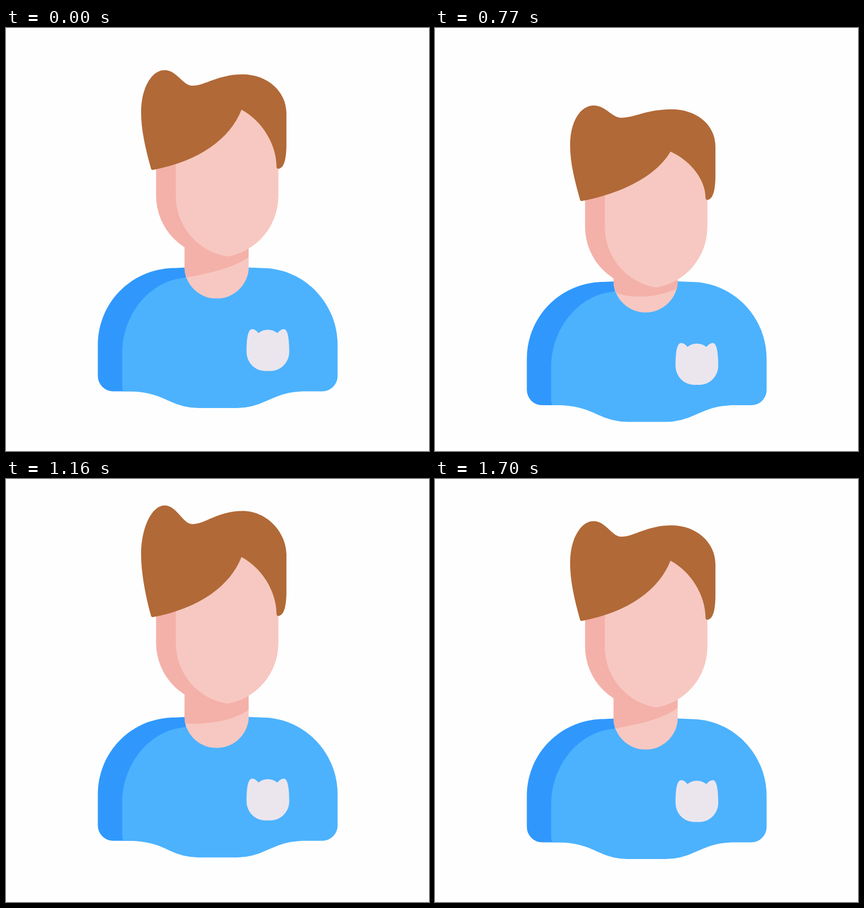
An HTML page for the animation above (1.73 s loop, 748 px wide and 748 px high).

```html
<!DOCTYPE html>
<html>
<head>
<meta charset="utf-8">
<style>
  html, body { margin: 0; height: 100%; overflow: hidden; background: #fefefe; }
  svg { display: block; width: 100%; height: 100%; }
</style>
</head>
<body>
<svg viewBox="-0.4 -0.5 748 748">
  <clipPath id="neckClip"><path d="M315 345V421A57 57 0 0 0 429 421V345Z"/></clipPath>
  <g id="body">
    <path fill="#3098fd" d="M162 560C162 485 222 424 298 424L318 423V642H189A27 27 0 0 1 162 615Z"/>
    <path fill="#4cb2fe" d="M318 441C255 445 205 505 205 575V632Q205 638 207 642H213C254 642 273 652 288 659Q314 671.500 340 671.500H408Q434 671.500 460 659C475 653 494 642 530 642H559A27 27 0 0 0 586 615V560C586 485 526 424 452 424L429 423Z"/>
    <path fill="#ebe6ee" d="M425 572C425 550 427 532 435 532C439 532 443 535 446 539C455 531 470 531 479.500 539C483 535 487 532 491 532C498 532 500.500 550 500.500 572C500.500 592 484 606 468 606H458C441 606 425 592 425 572Z"/>
    <g clip-path="url(#neckClip)">
      <path fill="#f7c8c1" d="M315 345H429V480H315Z"/>
      <path id="shadow" fill="#f4b1a9"/>
    </g>
  </g>
  <g id="head">
    <path fill="#f4b1a9" d="M265 200V296A108 108 0 0 0 481 296V200Z"/>
    <path fill="#f7c8c1" d="M300 200V296A108 108 0 0 0 391 403.500A108 108 0 0 0 481 296V200L470 150L416 137Z"/>
    <path id="hair" fill="#b16937"/>
  </g>
</svg>
<script>
const LOOP = 1730, HOLD = 500, STEP = 30;
const $ = id => document.getElementById(id);
const smooth = p => p * p * (3 - 2 * p);

// Rests until start, reaches the first peak, then eases to a new peak every gap.
function swing(n, start, first, gap, peaks) {
  let from = 0, t0 = start, t1 = first;
  for (const to of peaks) {
    if (n < t1) return from + (to - from) * smooth(Math.max(0, (n - t0) / (t1 - t0)));
    from = to;
    t0 = t1;
    t1 += gap;
  }
  return from;
}

// The shadow follows the chin, sags as the head drops and lags behind on the left.
function shadowPath(n, chin) {
  const lag = swing(n, 8, 17, 11, [16, 2.5, 0]);
  const sag = Math.max(0, chin) ** 2 / 40;
  return `M315 345V${441.5 - lag * 0.7}
    C352 ${434 + sag + lag * 0.3} 400 ${426 + sag + lag * 0.5} 429 ${404 + chin + lag}V345Z`;
}

// top squashes the crown, fringe lowers the parting
function hairPath(top, fringe) {
  const crown = 74 + top, right = 81.5 + top * 0.9;
  const dip = 101.5 + top * 0.74 - fringe * 0.2;
  const left = 148 + top * 0.4, side = 150 + top * 0.5;
  return `M259 250.500Q257 251 256 248
    C246 212 238.500 ${left + 32} 238.500 ${left}
    C238.500 ${104 + top * 0.6} 258 ${crown} 280 ${crown}
    C302 ${crown} 312 ${dip} 329 ${dip}
    C352 ${dip} 374 ${right} 418 ${right}
    C462 ${right} 495.500 ${112 + top * 0.5} 495.500 ${side}
    V205C495.500 232 491 248 481 248.500Q478 248 478 245
    C478 ${205 + fringe * 0.45} 452 ${163 + fringe * 0.85} 416 ${144 + fringe}
    C396 ${195 + fringe * 0.2} 342 235 259 250.500Z`;
}

function draw(time) {
  const n = Math.max(0, Math.floor((time % LOOP - HOLD) / STEP));
  const body = swing(n, 0.3, 6, 10, [33.5, -8, 0]);
  const head = swing(n, 2, 8, 9.3, [57.5, -23, 9, 0]);
  const top = swing(n, 0, 5, 8, [-13, 28, -22, 2.5, 0]);
  const fringe = swing(n, 5, 13, 8, [38, 0, 4, 0]);
  $('body').setAttribute('transform', `translate(0 ${body})`);
  $('head').setAttribute('transform', `translate(0 ${head})`);
  $('shadow').setAttribute('d', shadowPath(n, head - body));
  $('hair').setAttribute('d', hairPath(top, fringe));
}

let start;
function tick(now) {
  start ??= now;
  draw(now - start);
  requestAnimationFrame(tick);
}
draw(0);
requestAnimationFrame(tick);
</script>
</body>
</html>
```
